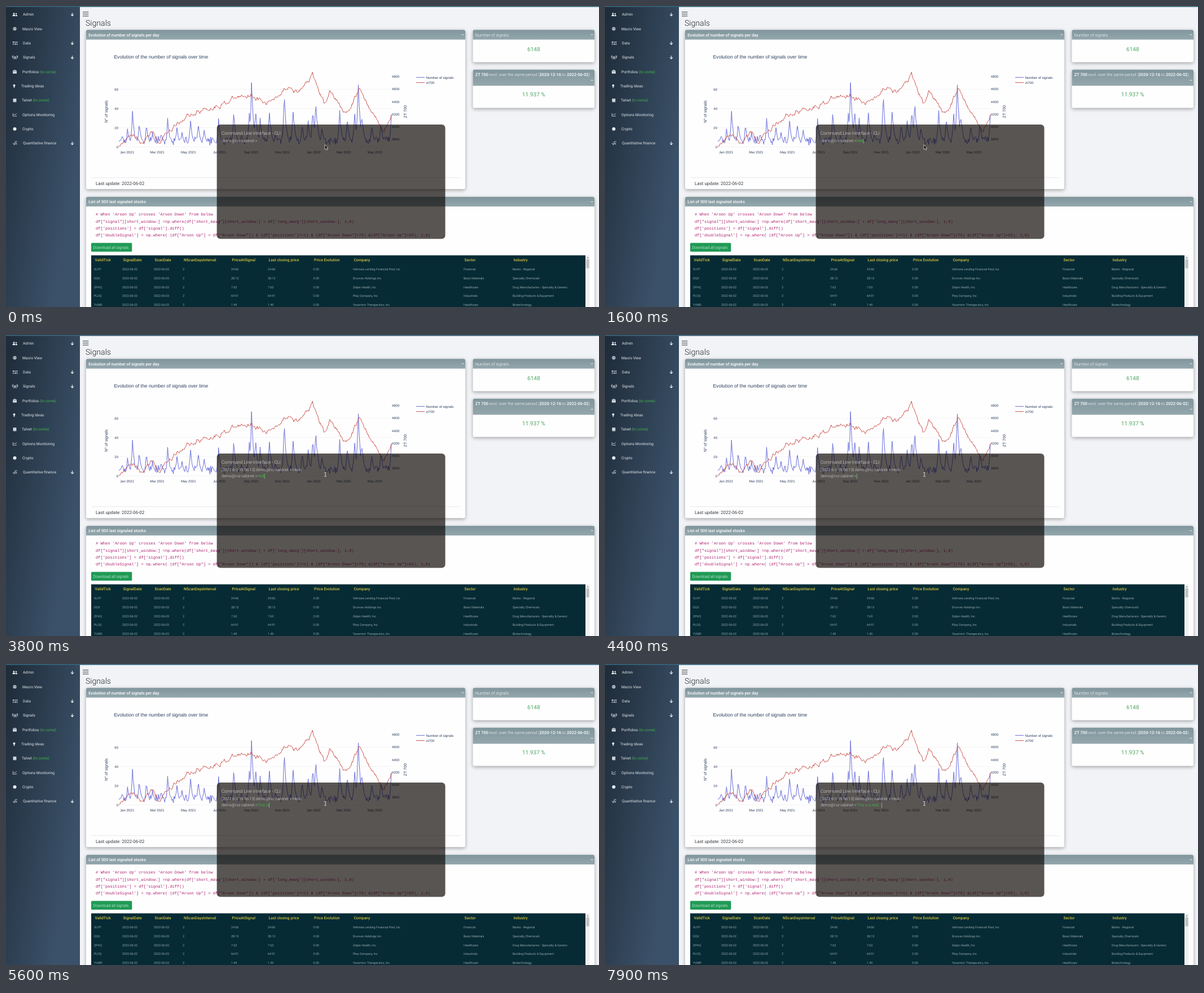
An HTML page for the animation above (8000 ms loop, 1051x533 px).

```html
<!DOCTYPE html>
<html lang="en">
<head>
<meta charset="utf-8">
<title>Signals</title>
<style>
  html, body { margin: 0; width: 100%; height: 100%; overflow: hidden; background: #f1f3f6; }
  svg { display: block; }
  text { font-family: Roboto, sans-serif; white-space: pre; text-rendering: geometricPrecision; }
  .plot text { font-family: "Liberation Sans", Arial, sans-serif; fill: #2a3f5f; }
  .code text { font-family: "Liberation Mono", monospace; fill: #ab1f6f; }
  .light { font-weight: 300; }
  .bold { font-weight: 500; }
  .card { fill: #fffefe; filter: drop-shadow(0 2px 3px #0005); }
  .icon { fill: #e6eaee; stroke: #e6eaee; stroke-width: 0; }
  .icon .line { fill: none; stroke-width: .8; }
  .icon .cut { fill: none; stroke: #263544; stroke-width: .5; }
</style>
</head>
<body>
<svg id="stage" width="1051" height="533" viewBox="0 0 1051 533"></svg>
<script>
const stage = document.getElementById('stage');
const esc = s => s.replace(/&/g, '&amp;').replace(/</g, '&lt;');
const text = (x, y, size, fill, s, more = '') =>
  `<text x="${x}" y="${y}" font-size="${size}" fill="${fill}" ${more}>${s}</text>`;
const rect = (x, y, w, h, fill, more = '') =>
  `<rect x="${x}" y="${y}" width="${w}" height="${h}" fill="${fill}" ${more}/>`;
const path = (d, stroke, width = 1) =>
  `<path d="${d}" fill="none" stroke="${stroke}" stroke-width="${width}" stroke-linejoin="round"/>`;
const each = (n, f) => Array.from({ length: n }, (_, i) => f(i)).join('');
const middle = 'text-anchor="middle"';
const light = 'class="light"';

let seed = 11;
const random = () => (seed = seed * 16807 % 2147483647) / 2147483647;

// Sidebar
const icons = {
  users: '<circle cx="14" cy="-1.6" r="1.4"/><circle cx="18" cy="-1.2" r="1.2"/><path d="M11.5 3q0-3 2.5-3t2.5 3zM16.8 3q0-2.4 1.3-2.4t2.4 2.4z"/>',
  globe: '<circle cx="15.5" cy="0" r="3.2"/><path class="cut" d="M12.3 0h6.4M15.5-3.2v6.4M13.8-3q-1.4 3 0 6M17.2-3q1.4 3 0 6"/>',
  data: '<path d="M12-2.6h2v2h-2zM15-2.6h1v2h-1zM17-2.6h1v2h-1zM19-2.6h1.3v2H19zM12 .7h1v2h-1zM14 .7h1v2h-1zM16 .7h2v2h-2zM19 .7h1.3v2H19z"/>',
  antenna: '<circle cx="16" cy="-1" r="1"/><path class="line" d="M16-1l-2.4 4.5M16-1l2.4 4.5M14.6 1.8h2.8M13.5-3q-1.6 2 0 4M18.5-3q1.6 2 0 4M12-3.6q-1.8 2.6 0 5.2M20-3.6q1.8 2.6 0 5.2"/>',
  bag: '<path d="M12-1.8h7v2h-7zM12 .7h7v2.3h-7z"/><path class="line" d="M14.2-2v-1h2.6v1"/>',
  bulb: '<circle cx="14.5" cy="-1" r="2"/><path d="M13.6 .8h1.8v2.2h-1.8z"/>',
  book: '<path d="M12.7-3.2h5.6v6.4h-4.6q-1-.2-1-1z"/><path class="cut" d="M14.2-1.4h3M14.2 1.8h3.5"/>',
  chart: '<path class="line" d="M12.3-2.6v5.2h6.8M13.6 .6l1.6-1.6 1.4 1.3 2.2-2.5"/>',
  disc: '<circle cx="15.5" cy="0" r="3"/>',
  root: '<path class="line" d="M12 .2h1.3l1.4 2.8 1.7-6h3.4M16.6-.8l2.6 3M19.2-.8l-2.6 3"/>',
};
const soon = ' <tspan fill="#43b649">(to come)</tspan>';
const menu = [
  ['users', 30, 'Admin', 1], ['globe', 29, 'Macro View'], ['data', 30, 'Data', 1],
  ['antenna', 30, 'Signals', 1], ['bag', 29, 'Portfolios' + soon], ['bulb', 27, 'Trading Ideas'],
  ['book', 28, 'Talvet' + soon], ['chart', 29, 'Options Monitoring'],
  ['disc', 29, 'Crypto'], ['root', 30, 'Quantitative finance', 1],
];
const sidebar = rect(0, 0, 131, 533, 'url(#side)') + menu.map(([icon, x, label, arrow], i) =>
  `<g transform="translate(0 ${15 + i * 25.35})"><g class="icon">${icons[icon]}</g>` +
  text(x, 2.3, 6.7, '#e2e7eb', label) +
  (arrow ? path('M117.5-3v5.6M115-.1l2.5 2.7 2.5-2.7', '#eef1f3', 1.1) : '') + '</g>').join('');

// Cards
const card = (x, y, w, h, head, title, minusY = y + 8.5, cls = 'bold') =>
  `<rect class="card" x="${x}" y="${y}" width="${w}" height="${h}" rx="3"/>` +
  `<path d="M${x} ${y + head}v${3 - head}q0-3 3-3h${w - 6}q3 0 3 3v${head - 3}z" fill="url(#head)"/>` +
  text(x + 4.3, y + 11.2, cls == 'bold' ? 7.3 : 7.4, '#fff', title, `class="${cls}"`) +
  path(`M${x + w - 6.5} ${minusY}h4`, '#f4f6f7', .9);
const strong = s => `<tspan font-weight="500">${s}</tspan>`;
const cards =
  card(142, 42.3, 672, 282, 17.2, 'Evolution of number of signals per day') +
  card(827.5, 42.3, 215.5, 57.2, 17.2, 'Number of signals', 50.8, 'light') +
  card(827.5, 112.7, 215.5, 67.8, 28.5,
    `${strong('ZT 700')} evol. over the same period (${strong('2020-12-16')} to ${strong('2022-06-02')})`, 131.5, 'light') +
  card(142, 338, 901, 220, 17, 'List of 500 last signaled stocks') +
  text(935.3, 79.6, 10, '#4fa765', '6148', middle) +
  text(935.3, 160.4, 10.1, '#4fa765', '11.937 %', middle) +
  rect(151, 303.5, 654, .8, '#dfe1e3') +
  text(159, 316.7, 8, '#333a40', 'Last update: 2022-06-02');

// Chart: an index drifting between turning points, and daily counts with random bursts
const left = 200, width = 483, days = 380;
const start = Date.UTC(2020, 11, 16), end = Date.UTC(2022, 5, 2);
const dateX = date => left + width * (date - start) / (end - start);
const countY = v => 249.5 - v * 1.7;
const indexY = v => 125 + (4800 - v) * .111;
const turns = [[0, 3700], [25, 3850], [30, 3714], [45, 3920], [55, 3800], [95, 4190], [185, 4535], [205, 4350],
  [240, 4700], [250, 4540], [270, 4790], [286, 4390], [295, 4560], [320, 4200], [335, 4600], [370, 3900], [380, 4177]];
const trend = day => {
  const i = Math.max(1, turns.findIndex(([at]) => at >= day));
  const [[d0, v0], [d1, v1]] = [turns[i - 1], turns[i]];
  return v0 + (v1 - v0) * (day - d0) / (d1 - d0);
};
const bursts = [[435, 70], [493, 57], [549, 53], [624, 73]];
for (let x = 203; x < 683; x += 8 + random() * 10) bursts.push([x, 10 + 33 * random()]);
const burst = x => Math.max(...bursts.map(([at, h]) => h * Math.exp(-Math.abs(x - at) / (x < at ? 2 : 4))));

let drift = 0;
const trace = y => 'M' + Array.from({ length: days + 1 }, (_, day) => {
  const x = left + day * width / days;
  return `${x.toFixed(1)} ${y(day, x).toFixed(1)}`;
}).join('L');
const counts = trace((day, x) => countY(Math.max(burst(x) * (.85 + random() * .2), 1 + random() * 10)));
const index = trace(day => {
  drift = drift * .8 + (random() - .5) * 65;
  return indexY(trend(day) + drift);
});
const blue = '#686edb', red = '#cb554e';
const month = i => {
  const date = Date.UTC(2021, i * 2, 1);
  const label = new Date(date).toLocaleString('en-US', { month: 'short', year: 'numeric', timeZone: 'UTC' });
  return text(dateX(date), 261.3, 6.06, '', label, middle);
};
const upright = (x, s) => text(0, 0, 7.07, '', s, `${middle} transform="translate(${x} 187) rotate(-90)"`);
const legend = (y, color, s) => path(`M727 ${y}h15`, color) + text(744.5, y + 2.2, 6.06, '', s);
const plot = '<g class="plot">' +
  text(191.4, 93.3, 8.58, '', 'Evolution of the number of signals over time') +
  each(4, i => path(`M${left} ${countY(i * 20)}h${width}`, '#eceef2', .6) +
    text(199, countY(i * 20) + 2.2, 6.06, '', i * 20, 'text-anchor="end"')) +
  each(6, i => text(683.8, 238.2 - i * 22.2, 6.06, '', 3800 + i * 200)) + each(9, month) +
  upright(180, 'N° of signals') + upright(709.5, 'ZT 700') +
  path(counts, blue) + path(index, red) +
  legend(126.4, blue, 'Number of signals') + legend(135.6, red, 'zt700') + '</g>';

// Code and table
const code = [
  `# When 'Aroon Up' crosses 'Aroon Down' from below`,
  `df["signal"][short_window:] =np.where(df['short_mavg'][short_window:] > df['long_mavg'][short_window:], 1,0)`,
  `df['positions'] = df['signal'].diff()`,
  `df['doubleSignal'] = np.where( (df["Aroon Up"] > df["Aroon Down"]) & (df['positions']==1) & (df["Aroon Down"]<75) &(df["Aroon Up"]>55), 1,0)`,
];
const columns = [[156, 'ValidTick'], [206, 'SignalDate'], [262, 'ScanDate'], [313.3, 'NScanDaysInterval'],
  [399, 'PriceAtSignal'], [464, 'Last closing price'], [544.5, 'Price Evolution'], [614.8, 'Company'],
  [811, 'Sector'], [898, 'Industry']];
const stocks = [
  ['VLFP', '24.66', 'Velmora Lending Financial Pool, Inc.', 'Financial', 'Banks - Regional'],
  ['DQX', '28.13', 'Drunvex Holdings Inc.', 'Basic Materials', 'Specialty Chemicals'],
  ['ZPHQ', '7.63', 'Zelpin Health, Inc.', 'Healthcare', 'Drug Manufacturers - Specialty & Generic'],
  ['PLOQ', '64.91', 'Ploq Company, Inc.', 'Industrials', 'Building Products & Equipment'],
  ['YVMR', '1.49', 'Yavomirin Therapeutics, Inc.', 'Healthcare', 'Biotechnology'],
];
const stockRow = ([tick, price, ...about], row) =>
  [tick, '2022-06-02', '2022-06-03', '2', price, price, '0.00', ...about]
    .map((s, i) => text(columns[i][0], 468.3 + row * 15.63, 5.42, '#d8dfe1', esc(s), light)).join('');
const table = '<g class="code">' +
  code.map((s, i) => text(159, 371.4 + i * 12.1, 7.07, '', esc(s))).join('') + '</g>' +
  rect(151, 419.6, 72.3, 15.4, '#209a56', 'rx="1.5"') + text(154.6, 429.8, 7, '#f2fbf5', 'Download all signals', light) +
  rect(151, 441.5, 876, 92, '#062b35') +
  columns.map(([x, s]) => text(x + 1.6, 452.1, 6.8, '#d8c23a', s, 'class="bold"')).join('') +
  stocks.map(stockRow).join('') +
  rect(1027.5, 441.5, 7, 92, '#f1f1f1') + rect(1028.2, 448.5, 5.4, 16, '#c1c1c1') +
  '<path d="M1029.3 446.5l1.7-2 1.7 2z" fill="#777"/>';

// Console
const prompt = 'demo@rvz-cabinet >', pale = '#e0e0e0';
const line1 = 241.2, lineStep = 11.3;
const dialog =
  rect(373.8, 210, 404.6, 202.3, '#080300', 'rx="6" fill-opacity=".67" stroke="#000" stroke-opacity=".12"') +
  text(382, 228, 8.05, pale, 'Command Line Interface - CLI', light) +
  text(382, line1, 7.05, pale, `[2022-6-3 19:56:13] ${prompt} Hello`, `id="sent" ${light}`) +
  '<g id="entry">' + text(382, line1, 7.05, pale, prompt, light) +
  text(445.8, line1, 7.05, '#3fd648', '', `id="typed" ${light}`) +
  rect(446, 234.4, .8, 9, '#5de065', 'id="caret"') + '</g>' +
  '<path id="arrow" d="M565 245.6v8.6l2-1.8 1.4 3 1.4-.7-1.4-2.9h2.6z" fill="#111" stroke="#eee" stroke-width=".7"/>' +
  '<g id="beam">' + path('M564.2 243.6h1.4l.5.5.5-.5h1.4M566.1 244v6M564.2 250.4h1.4l.5-.5.5.5h1.4', '#e8e8e8', .9) + '</g>';

stage.innerHTML = `<defs>
  <linearGradient id="side" x2=".9" y2=".6"><stop stop-color="#1e2b38"/><stop offset="1" stop-color="#3b5169"/></linearGradient>
  <linearGradient id="head" x2="0" y2="1"><stop stop-color="#7f959c"/><stop offset="1" stop-color="#94a7ad"/></linearGradient>
  </defs>` + rect(0, 0, 1051, 533, '#f1f3f6') + sidebar + rect(0, 0, 1051, 1.7, '#37647a') +
  path('M136 10.7h10.3M136 14.2h10.3M136 17.7h10.3', '#2f3438', 1.1) +
  text(141, 34.6, 14.1, '#212529', 'Signals', light) + cards + plot + table + dialog;

// Typing runs: start, pause between keys, keys ("<" deletes one)
const LOOP = 8000, ENTER = 3300, TICK = 100;
const runs = [[600, 0, 'H'], [1200, 200, 'ell'], [2500, 0, 'o'], [3800, 150, '<<<<<'], [4800, 100, 'Th'],
  [5100, 100, 'is i'], [5600, 0, 's'], [6200, 200, ' a'], [6700, 0, ' t'], [6900, 0, 'es'], [7100, 0, 't'], [7600, 150, '...']];
const keys = runs.flatMap(([from, pause, s]) =>
  [...s].map((key, i) => ({ key, at: Math.ceil((from + i * pause) / TICK) * TICK })));
const entered = t => keys.filter(k => k.at <= t)
  .reduce((s, { key }) => key == '<' ? s.slice(0, -1) : s + key, '');

const [sentLine, entry, typed, caret, arrow, beam] =
  ['sent', 'entry', 'typed', 'caret', 'arrow', 'beam'].map(id => document.getElementById(id));
const show = (el, on) => el.setAttribute('visibility', on ? 'visible' : 'hidden');

function draw(now) {
  const t = now % LOOP, sent = t >= ENTER;
  typed.textContent = entered(t);
  caret.setAttribute('x', 446 + typed.getComputedTextLength());
  entry.setAttribute('transform', `translate(0 ${sent ? lineStep : 0})`);
  show(caret, t >= 200);
  show(sentLine, sent);
  show(arrow, !sent);
  show(beam, sent);
  requestAnimationFrame(draw);
}
draw(0);
</script>
</body>
</html>
```
